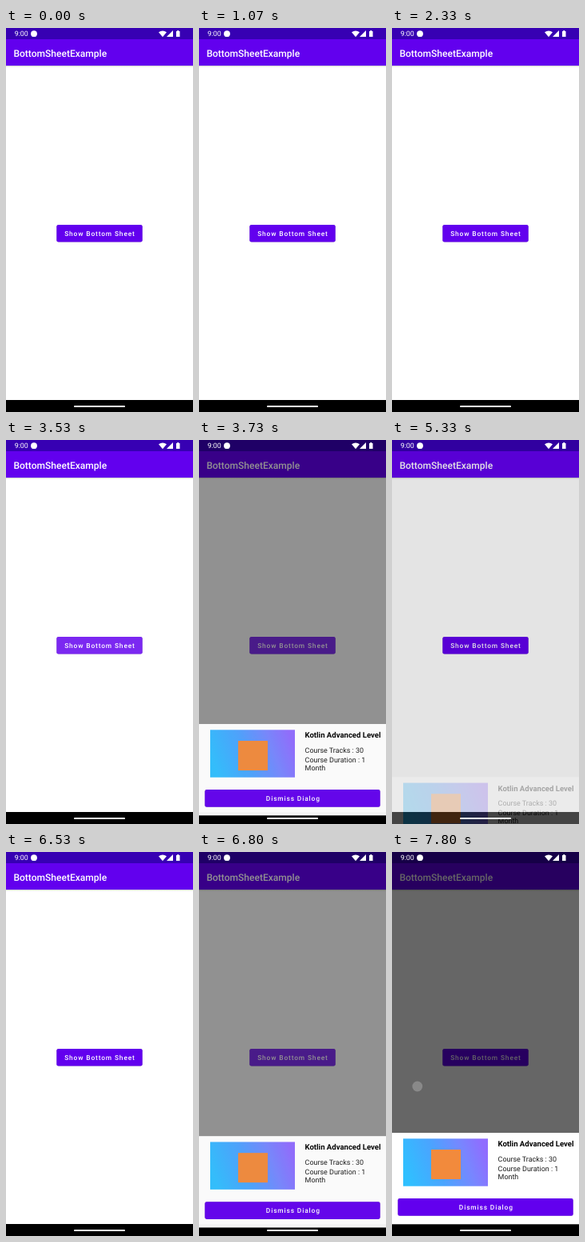
An HTML page that plays this animation: 234 by 480 pixels, repeating every 8000 ms.

```html
<!DOCTYPE html>
<html lang="en">
<head>
<meta charset="utf-8">
<title>Bottom sheet</title>
<style>
  html, body { margin: 0; width: 100%; height: 100%; overflow: hidden; background: #fff; }
  svg { display: block; width: 234px; height: 480px; }
  text { font-family: Roboto, "Open Sans", sans-serif; fill: #000; white-space: pre; text-rendering: geometricPrecision; }
  .light { fill: #fff; }
  .title { font-size: 12.05px; font-weight: 500; }
  .clock { font-size: 8.8px; }
  .label { font-size: 8.4px; font-weight: 500; letter-spacing: .86px; }
  .head { font-size: 9.55px; font-weight: 700; }
  .body { font-size: 8.95px; fill: #1c1c1c; }
  .button { fill: #6200ee; filter: drop-shadow(0 .8px .7px rgba(0, 0, 0, .25)); }
</style>
</head>
<body>
<svg viewBox="0 0 234 480" xmlns="http://www.w3.org/2000/svg">
  <defs>
    <linearGradient id="shade" x2="0" y2="1">
      <stop offset="0" stop-opacity=".2"/>
      <stop offset="1" stop-opacity="0"/>
    </linearGradient>
    <linearGradient id="banner" x1="0" y1=".6" x2="1" y2=".4">
      <stop offset="0" stop-color="#2fc0ff"/>
      <stop offset=".4" stop-color="#4aa4ff"/>
      <stop offset=".75" stop-color="#7886ff"/>
      <stop offset="1" stop-color="#906cff"/>
    </linearGradient>
  </defs>

  <!-- Screen -->
  <rect width="234" height="480" fill="#fff"/>
  <rect y="47" width="234" height="2" fill="url(#shade)"/>
  <rect width="234" height="47" fill="#6200ee"/>
  <rect width="234" height="14" fill="#3700b3"/>
  <text class="title light" x="9.4" y="35.8">BottomSheetExample</text>
  <rect class="button" x="63.3" y="245.9" width="107.4" height="21.7" rx="2.4"/>
  <rect id="ripple" x="63.3" y="245.9" width="107.4" height="21.7" rx="2.4" fill="#fff" opacity="0"/>
  <text class="label light" x="73.2" y="259.8">Show Bottom Sheet</text>

  <rect id="scrim" width="234" height="465" opacity="0"/>
  <circle id="touch" cx="31.8" cy="293" r="6.4" fill="#fff" opacity="0"/>
  <rect y="465" width="234" height="15"/>

  <!-- Bottom sheet -->
  <g id="sheet" opacity="0">
    <rect y="351" width="234" height="114.3" fill="#fff"/>
    <rect x="14" y="358.3" width="106" height="59.4" fill="url(#banner)"/>
    <rect x="49" y="372" width="37" height="37" fill="#f28a3c"/>
    <text class="head" x="132.5" y="368.3">Kotlin Advanced Level</text>
    <text class="body" x="132.6" y="386.8">Course Tracks : 30</text>
    <text class="body" x="132.6" y="398.8">Course Duration : 1</text>
    <text class="body" x="132.6" y="409.2">Month</text>
    <rect class="button" x="7.3" y="433.1" width="219.4" height="21.7" rx="2.4"/>
    <text class="label light" x="117.8" y="447.1" text-anchor="middle">Dismiss Dialog</text>
  </g>

  <!-- System icons -->
  <text class="clock light" x="10.8" y="10.4">9:00</text>
  <g fill="#fff">
    <circle cx="35" cy="7.2" r="3.9"/>
    <path d="M191 5.2Q196 1.6 201 5.2L196 11.2Z"/>
    <path d="M209 3V11H201Z"/>
    <path d="M213 4h1.3v-.9h1.9v.9h1.3v7H213Z"/>
    <rect x="85" y="472" width="64" height="2" rx="1"/>
  </g>
</svg>
<script>
const LOOP = 8000, FPS = 15, SLIDE = 96, DIM = 0.6;
const OPENS = [3603, 6670], CLOSE = 5205, TAP_LEAD = 135;

const [scrim, sheet, touch, ripple] =
  ['scrim', 'sheet', 'touch', 'ripple'].map(id => document.getElementById(id));
const clamp = v => Math.min(1, Math.max(0, v));
const easeInOut = v => (1 - Math.cos(Math.PI * v)) / 2;
const openAge = t => t - (t < CLOSE ? OPENS[0] : OPENS[1]);

// Returns how far the sheet is shown and how strong the scrim is, both 0 to 1.
function pose(t) {
  if (t >= CLOSE && t < OPENS[1]) {
    const age = t - CLOSE;
    return [1 - clamp(age / 150) ** 2, 1 - clamp(age / 156)];
  }
  const age = openAge(t);
  return [easeInOut(clamp(age / 150)), clamp(age / 181)];
}

// The button lights up just before the sheet opens, then fades.
function glow(t) {
  const age = openAge(t) + TAP_LEAD;
  return 0.24 * clamp(age / 100) * clamp((500 - age) / 300);
}

function draw(ms) {
  const t = Math.floor((ms % LOOP + 4) * FPS / 1000) * 1000 / FPS;
  const [shown, dim] = pose(t);
  sheet.setAttribute('opacity', shown);
  sheet.setAttribute('transform', `translate(0 ${SLIDE * (1 - shown)})`);
  scrim.setAttribute('opacity', DIM * dim);
  ripple.setAttribute('opacity', glow(t));
  touch.setAttribute('opacity', t >= 7799 ? 0.23 : 0);
}

const start = performance.now();
function tick() {
  draw(performance.now() - start);
  requestAnimationFrame(tick);
}
tick();
</script>
</body>
</html>
```
